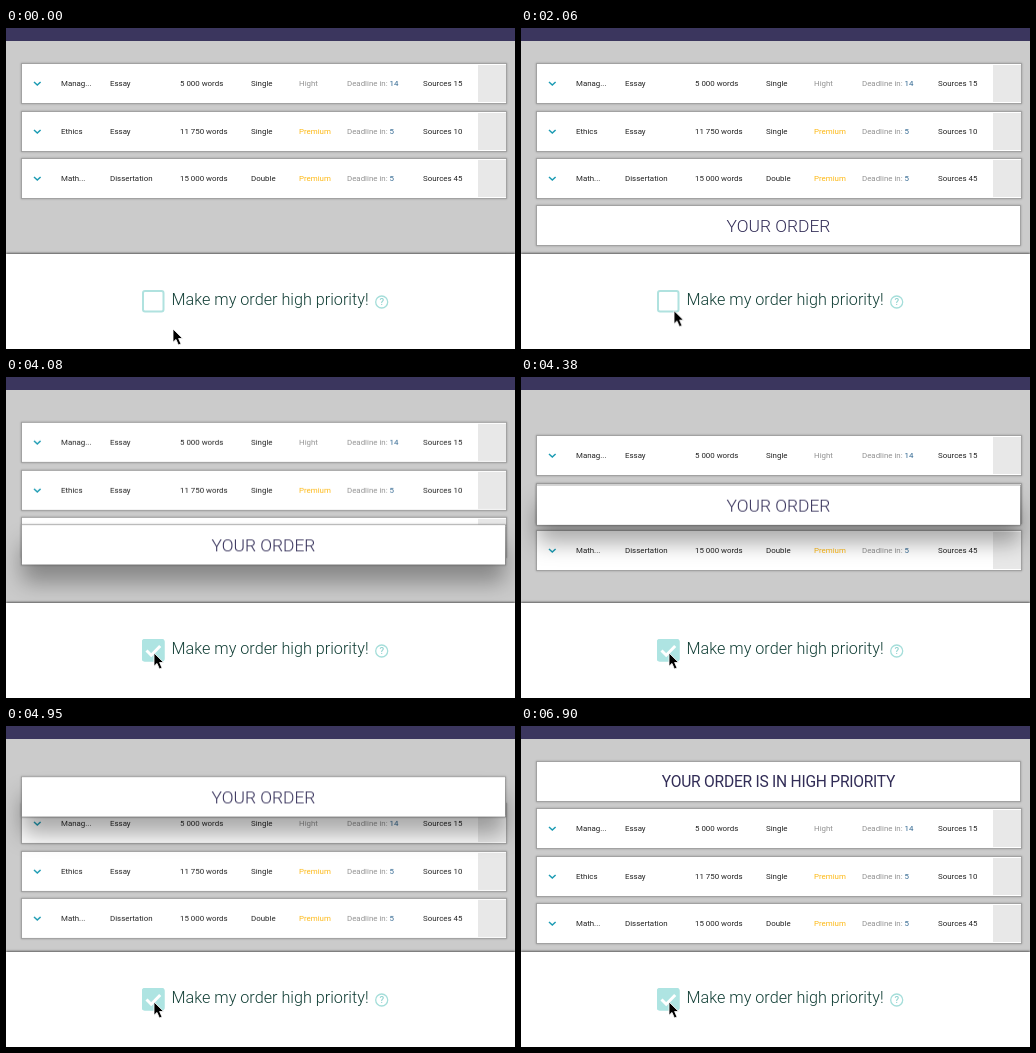
These frames come from a looping animation (509x321 px, 8.47 s). An HTML page:

```html
<!DOCTYPE html>
<html lang="en">
<head>
<meta charset="utf-8">
<title>High priority order</title>
<style>
  html, body { margin: 0; width: 100%; height: 100%; overflow: hidden; }
  .stage {
    position: relative; width: 509px; height: 321px; overflow: hidden;
    background: #cbcbcb; font-family: Roboto, sans-serif;
    --loop: 8470ms linear infinite;
  }
  .stage div, .stage svg, .row span { position: absolute; }
  .header { left: 0; top: 0; width: 509px; height: 13px; background: #3b365e; }

  .rows { left: 0; top: 0; animation: shift var(--loop); }
  .row, .card {
    left: 15px; width: 486px; height: 41px; box-sizing: border-box;
    background: #fff; border: 1px solid #a2a2a2;
    box-shadow: 0 0 2px rgba(0, 0, 0, .25);
  }
  .row span { top: 0; font-size: 7.9px; line-height: 39px; color: #222; white-space: nowrap; }
  .row svg { left: 11px; top: 17px; }
  .row .handle { right: 0; top: 1px; width: 28px; height: 37px; background: #e8e8e8; }
  .row .grey { color: #929292; }
  .row .gold { color: #fdb813; }
  .row b { font-weight: 400; color: #2f6690; }

  .card { top: 0; width: 485px; animation: rise var(--loop); }
  .shade {
    inset: 0; box-shadow: 0 18px 22px rgba(0, 0, 0, .34);
    animation: lift var(--loop);
  }
  .face { inset: 0; background: #fff; }
  .title {
    left: 0; right: 0; top: 1px; line-height: 39px; text-align: center;
    white-space: nowrap; color: #322d57;
  }
  .before { font-size: 17.4px; font-weight: 300; animation: fade-out var(--loop); }
  .after { font-size: 15.6px; letter-spacing: -.25px; animation: fade-in var(--loop); }

  .panel {
    left: 0; top: 226px; width: 509px; height: 95px; background: #fff;
    box-shadow: 0 -1px 2px rgba(0, 0, 0, .55);
  }
  .label {
    left: 165.5px; top: 262px; line-height: 20px; font-size: 16.2px; font-weight: 300;
    white-space: nowrap; color: #123f36;
  }
  .overlay { left: 0; top: 0; }
  .checked { animation: check var(--loop); }
  .cursor { animation: point var(--loop); }

  @keyframes rise {
    0%, 7.08% { transform: translateY(227px); animation-timing-function: ease-out; }
    10.63%, 42.5% { transform: translateY(177px); animation-timing-function: cubic-bezier(.33, 0, .45, 1); }
    64.94%, 100% { transform: translateY(35px); }
  }
  @keyframes shift {
    0%, 42.5% { transform: translateY(0); animation-timing-function: cubic-bezier(.33, 0, .45, 1); }
    64.94%, 100% { transform: translateY(47px); }
  }
  @keyframes lift {
    0%, 38.96% { opacity: 0; }
    43%, 58.5% { opacity: 1; }
    69.42%, 100% { opacity: 0; }
  }
  @keyframes fade-out {
    0%, 64.94% { opacity: 1; }
    73.2%, 100% { opacity: 0; }
  }
  @keyframes fade-in {
    0%, 73.2% { opacity: 0; }
    81.46%, 100% { opacity: 1; }
  }
  @keyframes check {
    0%, 33.05% { opacity: 0; }
    33.06%, 100% { opacity: 1; }
  }
  @keyframes point {
    0%, 16.53% { transform: translate(167px, 301px); }
    27.15%, 100% { transform: translate(148px, 276px); }
  }
</style>
</head>
<body>
<div class="stage">
  <div class="header"></div>
  <div class="rows"></div>
  <div class="card">
    <div class="shade"></div>
    <div class="face"></div>
    <div class="title before">YOUR ORDER</div>
    <div class="title after">YOUR ORDER IS IN HIGH PRIORITY</div>
  </div>
  <div class="panel"></div>
  <div class="label">Make my order high priority!</div>
  <svg class="overlay" width="509" height="321">
    <rect x="137" y="263" width="20.5" height="20.5" rx="2" fill="#fff" stroke="#b0e2df" stroke-width="2"/>
    <g class="checked">
      <rect x="136" y="262" width="22.5" height="22.5" rx="2.5" fill="#aee4e2"/>
      <path d="M140.5 273.5l4.7 4.7 9-9.2" fill="none" stroke="#fff" stroke-width="3"/>
    </g>
    <circle cx="375.7" cy="274" r="6" fill="none" stroke="#a5deda" stroke-width="1.3"/>
    <text x="375.7" y="277.4" font-size="9.5" font-weight="500" text-anchor="middle" fill="#8fd3cf">?</text>
    <path class="cursor" d="M0 0V13.2L3 10.4 5.4 16 8 14.9 5.6 9.5H9.6Z" fill="#000" stroke="#fff" stroke-width=".8"/>
  </svg>
</div>
<script>
  const columns = [39, 88, 158, 229, 277, 325, 401];
  const orders = [
    { top: 35, cells: ['Manag...', 'Essay', '5 000 words', 'Single', 'Hight', 14, 'Sources 15'] },
    { top: 83, cells: ['Ethics', 'Essay', '11 750 words', 'Single', 'Premium', 5, 'Sources 10'] },
    { top: 130, cells: ['Math...', 'Dissertation', '15 000 words', 'Double', 'Premium', 5, 'Sources 45'] }
  ];
  const styles = { Hight: 'grey', Premium: 'gold' };
  const chevron = '<svg width="9" height="6"><path d="M1 1l3.3 3 3.3-3" fill="none" stroke="#1b9bb3" stroke-width="1.5"/></svg>';

  function cell(value, i) {
    const days = typeof value === 'number';
    const text = days ? `Deadline in: <b>${value}</b>` : value;
    const style = days ? 'grey' : styles[value] || '';
    return `<span class="${style}" style="left:${columns[i]}px">${text}</span>`;
  }

  document.querySelector('.rows').innerHTML = orders.map(({ top, cells }) =>
    `<div class="row" style="top:${top}px">${chevron}${cells.map(cell).join('')}<div class="handle"></div></div>`
  ).join('');
</script>
</body>
</html>
```
